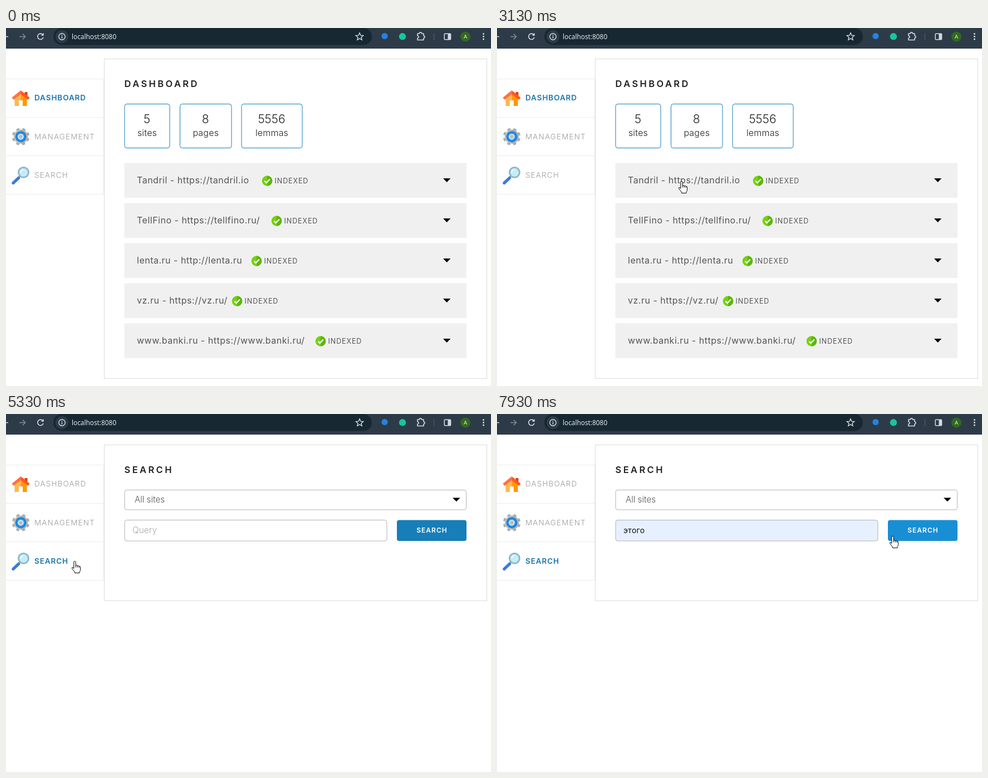
An HTML page for the animation above (8000 ms loop, 871x643 px).

```html
<!DOCTYPE html>
<html lang="en">
<head>
<meta charset="utf-8">
<title>Search engine admin</title>
<style>
html, body { margin: 0; width: 100%; height: 100%; overflow: hidden; background: #fff; }
svg { display: block; }
text { font-family: Inter, "Open Sans", sans-serif; white-space: pre; }
.ui { font-family: "Open Sans", "Noto Sans", sans-serif; fill: #fff; }
.url { font-size: 11.9px; fill: #f1f4f6; }
.item { font-size: 11.2px; }
.menu { font-size: 13.5px; letter-spacing: 1.15px; fill: #9b9b9b; font-weight: 300; }
.menu.on { font-weight: 600; letter-spacing: .9px; fill: #1b75ad; }
.head { font-size: 16.5px; font-weight: 600; letter-spacing: 3.4px; fill: #222; }
.num { font-size: 21px; font-weight: 300; fill: #222; text-anchor: middle; }
.unit { font-size: 16px; font-weight: 300; letter-spacing: .2px; fill: #222; text-anchor: middle; }
.site { font-size: 16px; letter-spacing: .5px; fill: #555; }
.tag { font-size: 12.5px; letter-spacing: .9px; fill: #555; }
.label { font-size: 16px; fill: #444; }
.value { font-size: 15px; letter-spacing: -.55px; font-weight: 300; fill: #444; }
.null { font-size: 16px; font-weight: 300; fill: #b5532f; }
.bold { font-size: 15.5px; font-weight: 600; letter-spacing: .25px; fill: #222; }
.btn { font-size: 12px; font-weight: 600; letter-spacing: 1.05px; fill: #fff; text-anchor: middle; }
.soft { font-size: 15.2px; font-weight: 300; fill: #555; }
.hint { font-size: 15.4px; font-weight: 300; fill: #a9a9a9; }
.preview { font-family: "Open Sans", "Noto Sans", sans-serif; font-size: 11.4px; fill: #111; }
.typed { font-size: 14px; letter-spacing: .3px; fill: #111; }
</style>
</head>
<body>
<svg id="stage" width="871" height="643" viewBox="0 0 871 643"></svg>
<script>
const LOOP = 8000, STEP = 1000 / 15;
const BLUE = '#177eb9', BLUE_HOVER = '#188fd5';

const text = (x, y, s, cls, extra = '') => `<text x="${x}" y="${y}" class="${cls}" ${extra}>${s}</text>`;
const rect = (x, y, w, h, fill, extra = '') =>
  `<rect x="${x}" y="${y}" width="${w}" height="${h}" fill="${fill}" ${extra}/>`;
const circle = (x, y, r, fill, extra = '') => `<circle cx="${x}" cy="${y}" r="${r}" fill="${fill}" ${extra}/>`;
const path = (d, fill, extra = '') => `<path d="${d}" fill="${fill}" ${extra}/>`;
const line = (d, color, w) => path(d, 'none', `stroke="${color}" stroke-width="${w}"`);
const at = (x, y, body, extra = '') => `<g transform="translate(${x} ${y})" ${extra}>${body}</g>`;
const button = (x, y, w, h, label, id = '') =>
  rect(x, y, w, h, BLUE, `rx="4" ${id}`) + text(x + w / 2 + .5, y + h / 2 + 4.2, label, 'btn');
const field = (x, y, w, h, extra = '') => rect(x, y, w, h, '#fff', `rx="4" stroke="#b2b2b2" ${extra}`);
const frame = (x, h) => rect(x, 55.5, 863.5 - x, h, '#fff', 'stroke="#dcdcdc"');

function browserBar() {
  const c = '#d3dbe1';
  return rect(0, 0, 871, 37, '#2d3b48') +
    rect(85, 0, 572, 30.5, '#172833', 'rx="15"') +
    line('M0 15.5H4', c, 1.5) +
    line('M24 15.5H34.5M29.8 10.6L34.7 15.5L29.8 20.4', '#7d8a95', 1.5) +
    line('M66.3 12.4A5.2 5.2 0 1 0 67 16.8M66.9 9.6V13H63.4', c, 1.6) +
    circle(100.5, 15.5, 11.5, '#2d3b48') +
    circle(100.5, 15.5, 5.7, 'none', `stroke="${c}" stroke-width="1.4"`) +
    line('M100.5 14.8V18.6M100.5 12V13.6', c, 1.5) +
    text(118, 19.7, 'localhost:8080', 'ui url') +
    path('M635 8.8L636.9 13.2L641.6 13.6L638 16.7L639.1 21.4L635 18.9L630.9 21.4L632 16.7L628.4 13.6L633.1 13.2Z',
      'none', `stroke="${c}" stroke-width="1.4"`) +
    circle(680, 14.5, 5.6, '#2583dd') +
    circle(712, 15.3, 6.2, '#16c79a') +
    path('M739 10H742.3A2 2 0 0 1 746.5 10H750V14A2 2 0 0 1 750 18V21.5H739V18A2 2 0 0 0 739 14Z',
      'none', `stroke="${c}" stroke-width="1.6" stroke-linejoin="round"`) +
    rect(768, 9, 1, 13, '#52606c') +
    rect(787.2, 10.2, 11.4, 10.6, 'none', `rx="1" stroke="${c}" stroke-width="1.5"`) +
    rect(793.5, 10.2, 5.2, 10.6, c) +
    circle(825, 15.5, 9, '#33691e') +
    text(825, 19, 'A', 'ui', 'font-size="9.5" text-anchor="middle"') +
    [10.5, 15.3, 20.1].map(y => circle(857.5, y, 1.5, c)).join('');
}

function houseIcon() {
  return path('M7 -11H12V-2L7 -6Z', '#d84315') +
    path('M-11 -2L0 -11L0 14H-11Z', '#ffb74d') + path('M0 -11L11 -2V14H0Z', '#ff9800') +
    path('M-3.5 14V4H3.5V14Z', '#fff') +
    path('M0 -14L-16 -1L-13 3L0 -7Z', '#ff7043') + path('M0 -14L16 -1L13 3L0 -7Z', '#ff5722');
}
function gearIcon() {
  const ring = 2 * Math.PI * 13.6 / 16;
  return circle(0, 0, 13.6, 'none', `stroke="#a3adb3" stroke-width="4.4" stroke-dasharray="${ring}" transform="rotate(11)"`) +
    circle(0, 0, 12.6, '#b5bdc2') + path('M0 -12.6A12.6 12.6 0 0 1 0 12.6Z', '#a3adb3') +
    circle(0, 0, 7.6, '#d5e8f5', 'stroke="#1976d2" stroke-width="4.2"') +
    circle(0, 0, 7, 'none', 'stroke="#2196f3" stroke-width="2"') + circle(0, 0, 3.2, '#b0bec5');
}
function lensIcon() {
  return line('M-1 1L-5 5', '#8fa3ad', 3.4) +
    path('M-4 5L-13.5 14', 'none', 'stroke="#3d78e0" stroke-width="5.4" stroke-linecap="round"') +
    circle(5, -5, 9, '#c5ecf7', 'stroke="#8db7c6" stroke-width="2.8"') +
    path('M-1 -4A6 6 0 0 1 5 -11Q2 -7 -1 -4Z', '#f1fcff');
}
function menu() {
  const items = [['DASHBOARD', houseIcon], ['MANAGEMENT', gearIcon], ['SEARCH', lensIcon]];
  return [91.5, 160.7, 230, 299].map(y => rect(0, Math.round(y) - 1, 176, 1, '#ececec')).join('') +
    rect(175, 91, 1, 208, '#ececec', 'id="edge"') +
    items.map(([name, icon], i) => at(26.5, 126 + i * 69.2, icon()) +
      text(51, 130.3 + i * 69.2, name, 'menu')).join('');
}

function siteRow([title, badgeX], i) {
  const check = circle(0, 0, 9.3, '#76d111') + path('M0 -9.3A9.3 9.3 0 0 1 0 9.3Z', '#5cb60b') +
    path('M-4.6 .3L-1.3 3.6L4.8 -3', 'none', 'stroke="#fff" stroke-width="2.2"');
  return at(0, 242 + i * 72,
    rect(212.5, 0.5, 614.5, 62.5, '#f0f0f0') + text(235, 36.8, title, 'site') +
    at(badgeX, 32.5, check) + text(badgeX + 13.6, 36.7, 'INDEXED', 'tag') +
    path('M785 28H798.4L791.7 35Z', '#000', 'class="caret"'));
}
function dashboard() {
  const stats = [[212.5, 81, 5, 'sites'], [312, 92.5, 8, 'pages'], [422.5, 109, 5556, 'lemmas']];
  const sites = [
    ['Tandril - https://tandril.io', 469], ['TellFino - https://tellfino.ru/', 486],
    ['lenta.ru - http://lenta.ru', 450], ['vz.ru - https://vz.ru/', 415],
    ['www.banki.ru - https://www.banki.ru/', 565]];
  const details = [['Status time:', '26.1.2024 16:51:34'], ['Pages:', 3], ['Lemmas:', 1103], ['Error:', 'null']];
  const rows = sites.map(siteRow);
  return frame(176.5, 574).replace('<rect', '<rect id="dashFrame"') + text(212.5, 106, 'DASHBOARD', 'head') +
    stats.map(([x, w, n, unit]) => rect(x + .5, 136.5, w, 79, '#fff', `rx="4" stroke="${BLUE}"`) +
      text(x + w / 2, 170.5, n, 'num') + text(x + w / 2 + .5, 194, unit, 'unit')).join('') +
    rows[0] +
    `<svg id="panel" x="212.5" y="305" width="614.5" height="0" overflow="hidden">` +
    rect(0, 0, 615, 130.5, '#fafafa') +
    details.map(([k, v], i) => text(22.7, 34 + i * 24.3, k, 'label', i == 3 ? 'style="fill:#000"' : '') +
      text(166, 34 + i * 24.3, v, i == 3 ? 'null' : 'value')).join('') + '</svg>' +
    `<g id="lower">${rows.slice(1).join('')}</g>`;
}

function management() {
  return frame(177.5, 280) + text(213.5, 106, 'MANAGEMENT', 'head') +
    button(213.5, 136.5, 186.5, 37.5, 'START INDEXING') + text(213.5, 205.3, 'Add/update page:', 'bold') +
    field(213.5, 227.5, 435.5, 37) + button(667.5, 227, 159.5, 38, 'ADD/UPDATE');
}

const WORDS = ['история', 'tellfino', 'весна', 'этого', 'этот'];
const POP_TOP = 240, ITEM = 32.3;
function search() {
  return frame(176.5, 280) + text(212.5, 106, 'SEARCH', 'head') +
    field(213, 136.5, 613.5, 35.5) + text(231, 159.3, 'All sites', 'soft') +
    path('M802 150.5H815.6L808.8 157.3Z', '#000') +
    field(213, 190.5, 471, 37.5, 'id="query"') + text(227, 214.3, '', '', 'id="value"') +
    rect(227, 200, 1, 17.5, '#000', 'id="blink"') +
    button(702, 190.5, 125, 37.5, 'SEARCH', 'id="go"') +
    '<g id="popup">' + rect(300, 237, 142.5, 171, '#000', 'rx="5" opacity=".1"') +
    path('M311.5 237L318.5 229.8Q320 228.6 321.5 229.8L328.5 237Z', '#191c1f') +
    rect(301.3, 236, 139.7, 169, '#191c1f', 'rx="3"') +
    rect(301.3, 0, 139.7, ITEM, '#2f3235', 'id="hover"') +
    WORDS.map((w, i) => text(312, POP_TOP + i * ITEM + 20.5, w, 'ui item')).join('') + '</g>';
}

const CURSORS = {
  hand: path('M-1.7 13V1.6a1.7 1.7 0 0 1 3.4 0V7.6q2-1.2 3 .6q2-1 3 .8q2.2-.8 2.4 1.6V15q0 2.5-1.6 4V21H0V19.4L-4.8 13.2Q-5.6 10.4-3.4 11Z',
    '#fff', 'stroke="#000" stroke-linejoin="round"') + line('M1.7 7.6V11M4.7 8.2V11.2M7.7 9V11.6', '#000', 1),
  arrow: path('M0 0V15.6L3.6 12.3L6 17.6L8.4 16.5L6.1 11.4H11Z', '#fff', 'stroke="#000" stroke-width=".9"'),
  beam: line('M-3-8.5h2q1 0 1 1V7.5q0 1-1 1h-2M3-8.5h-2q-1 0-1 1M3 8.5h-2q-1 0-1-1', '#000', 1)
};

// time, hot spot x, y, shape from then on
const POINTER = [
  [540, 338, 680, 'arrow'], [600, 326, 632, 'arrow'], [800, 272, 470, 'hand'], [870, 240, 400, 'arrow'],
  [1000, 188, 300, 'arrow'], [1067, 155, 255, 'hand'], [1267, 108, 177], [1333, 111, 152],
  [1400, 116, 138], [1467, 116, 132], [1667, 116, 132], [2000, 120, 177], [2400, 120, 177], [2533, 129, 133],
  [2667, 129, 133], [2800, 170, 155, 'arrow'], [3000, 290, 235, 'arrow'], [3067, 318, 258, 'hand'],
  [3133, 331, 275], [3200, 331, 275], [3467, 331, 296], [3600, 275, 278], [3733, 208, 250, 'arrow'],
  [3867, 168, 228, 'hand'], [4000, 149, 216], [4200, 149, 216], [4533, 124, 265], [4667, 124, 265],
  [4733, 123, 264], [5533, 123, 264], [5667, 170, 255, 'arrow'], [5867, 280, 222, 'beam'], [6000, 320, 209],
  [6267, 320, 209], [6333, 327, 240, 'arrow'], [6533, 348, 287], [6733, 349, 326], [6867, 350, 350],
  [7133, 350, 353], [7200, 350, 353], [7467, 490, 300], [7733, 665, 236], [7867, 706, 222, 'hand'], [7933, 710, 219]];

const PAGES = [[0, 0], [2200, 1], [2733, 0], [4133, 1], [5333, 2]];
const OPEN_AT = 3200, FOCUS_AT = 6067, PICK_AT = 7267;

const stage = document.getElementById('stage');
stage.innerHTML = rect(0, 0, 871, 643, '#fff') + browserBar() + menu() +
  [dashboard, management, search].map(p => `<g class="page">${p()}</g>`).join('') +
  `<g id="pointer">${Object.entries(CURSORS).map(([k, v]) => `<g data-kind="${k}">${v}</g>`).join('')}</g>`;

const $ = id => document.getElementById(id);
const all = q => [...stage.querySelectorAll(q)];
const pages = all('.page'), labels = all('.menu'), shapes = all('[data-kind]');
const firstCaret = all('.caret')[0];
const show = (el, on) => el.setAttribute('display', on ? 'inline' : 'none');
const clamp = v => Math.max(0, Math.min(1, v));

function pointerAt(t) {
  let kind = 'hand', i = 0;
  while (i < POINTER.length && POINTER[i][0] <= t + 5) kind = POINTER[i++][3] || kind;
  const a = POINTER[Math.max(0, i - 1)], b = POINTER[Math.min(i, POINTER.length - 1)];
  const p = a === b ? 0 : clamp((t - a[0]) / (b[0] - a[0]));
  if (i && !a[3] && b[3] === undefined && a[1] === b[1] && a[2] === b[2]) return { x: a[1], y: a[2], kind };
  return { x: a[1] + (b[1] - a[1]) * p, y: a[2] + (b[2] - a[2]) * p, kind };
}

function drawSearch(t, cur) {
  const popup = t >= FOCUS_AT - 5 && t < PICK_AT - 5, picked = t >= PICK_AT - 5;
  const index = popup && cur.kind === 'arrow' ? Math.floor((cur.y - POP_TOP) / ITEM) : -1;
  const value = $('value'), word = picked ? WORDS[3] : WORDS[index];
  show($('popup'), popup);
  show($('hover'), index >= 0);
  $('hover').setAttribute('y', POP_TOP + Math.max(0, index) * ITEM);
  value.textContent = word || 'Query';
  value.setAttribute('class', picked ? 'typed' : word ? 'preview' : 'hint');
  $('query').setAttribute('fill', word ? '#e7f0fe' : '#fff');
  show($('blink'), t >= FOCUS_AT - 5 && Math.floor((t - FOCUS_AT + 5) / 500) % 2 === 0);
  $('blink').setAttribute('x', picked ? 268 : 227);
  $('go').setAttribute('fill', cur.x > 702 && cur.y < 228 ? BLUE_HOVER : BLUE);
}

function draw(time) {
  const t = Math.floor(time / STEP + .06) * STEP;
  const page = PAGES.filter(p => p[0] <= t + 5).pop()[1];
  const cur = pointerAt(t);
  pages.forEach((p, i) => show(p, i === page));
  labels.forEach((l, i) => l.setAttribute('class', i === page ? 'menu on' : 'menu'));
  $('edge').setAttribute('x', page === 1 ? 176 : 175);

  const h = 130 * clamp((t - OPEN_AT) / 266);
  $('panel').setAttribute('height', h);
  $('lower').setAttribute('transform', `translate(0 ${h})`);
  $('dashFrame').setAttribute('height', 574 + h);
  firstCaret.setAttribute('transform', h ? 'rotate(180 791.3 31.5)' : '');

  if (page === 2) drawSearch(t, cur);

  show($('pointer'), t >= 595);
  $('pointer').setAttribute('transform', `translate(${Math.round(cur.x) + .5} ${Math.round(cur.y) + .5})`);
  shapes.forEach(s => show(s, s.dataset.kind === cur.kind));
}

const start = performance.now();
function tick() {
  draw((performance.now() - start) % LOOP);
  requestAnimationFrame(tick);
}
tick();
</script>
</body>
</html>
```
